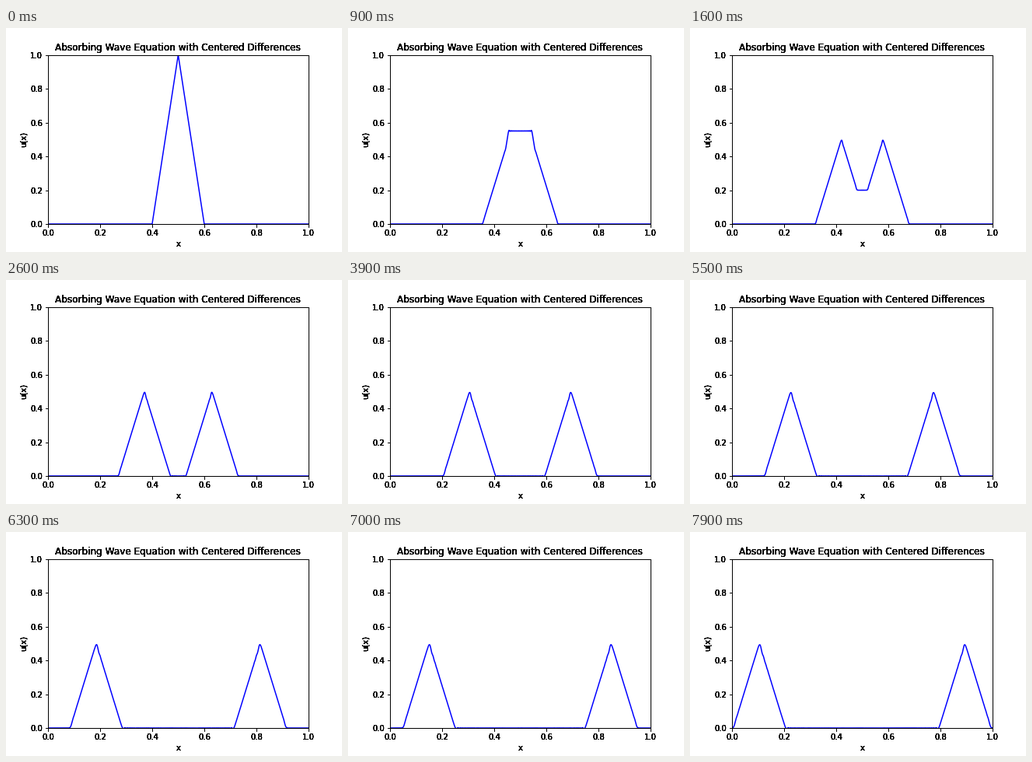
These frames come from a looping animation (432 by 288 pixels, 8 s). A matplotlib script:

```python
import numpy as np
import matplotlib.pyplot as plt
from matplotlib.animation import FuncAnimation

plt.rcParams.update({"font.family": "DejaVu Sans", "font.size": 10})

FRAMES, INTERVAL = 80, 100
DX, DT = 0.001, 0.0005
STEPS_PER_FRAME = 10
LAYERS = 6  # stacked copies harden the antialiased text


def solve(x):
    """Leapfrog wave solver with absorbing ends; one row per frame."""
    r = DT / DX
    k = (r - 1) / (r + 1)
    u = np.maximum(0, 1 - 10 * np.abs(x - 0.5))
    prev = u.copy()
    prev[1:-1] += 0.5 * r**2 * np.diff(u, 2)
    rows = [u]
    for _ in range(FRAMES - 1):
        for _ in range(STEPS_PER_FRAME):
            new = np.empty_like(u)
            new[1:-1] = 2 * u[1:-1] - prev[1:-1] + r**2 * np.diff(u, 2)
            new[0] = u[1] + k * (new[1] - u[0])
            new[-1] = u[-2] + k * (new[-2] - u[-1])
            prev, u = u, new
        rows.append(u)
    return rows


def add_panel(fig, first):
    ax = fig.add_axes([0.125, 0.125, 0.775, 0.755])
    ax.set(xlim=(0, 1), ylim=(0, 1), xlabel="x", ylabel="u(x)")
    ax.set_title("Absorbing Wave Equation with Centered Differences")
    ax.patch.set_visible(first)
    return ax


x = np.linspace(0, 1, round(1 / DX) + 1)
waves = solve(x)

fig = plt.figure(figsize=(6, 4), dpi=72, facecolor="white")
panels = [add_panel(fig, i == 0) for i in range(LAYERS)]
line, = panels[0].plot(x, waves[0], color="blue", lw=1.5)


def update(i):
    line.set_ydata(waves[i])
    return line,


anim = FuncAnimation(fig, update, frames=FRAMES, interval=INTERVAL,
                     init_func=lambda: update(0), repeat=True, repeat_delay=0)
plt.show()
```
